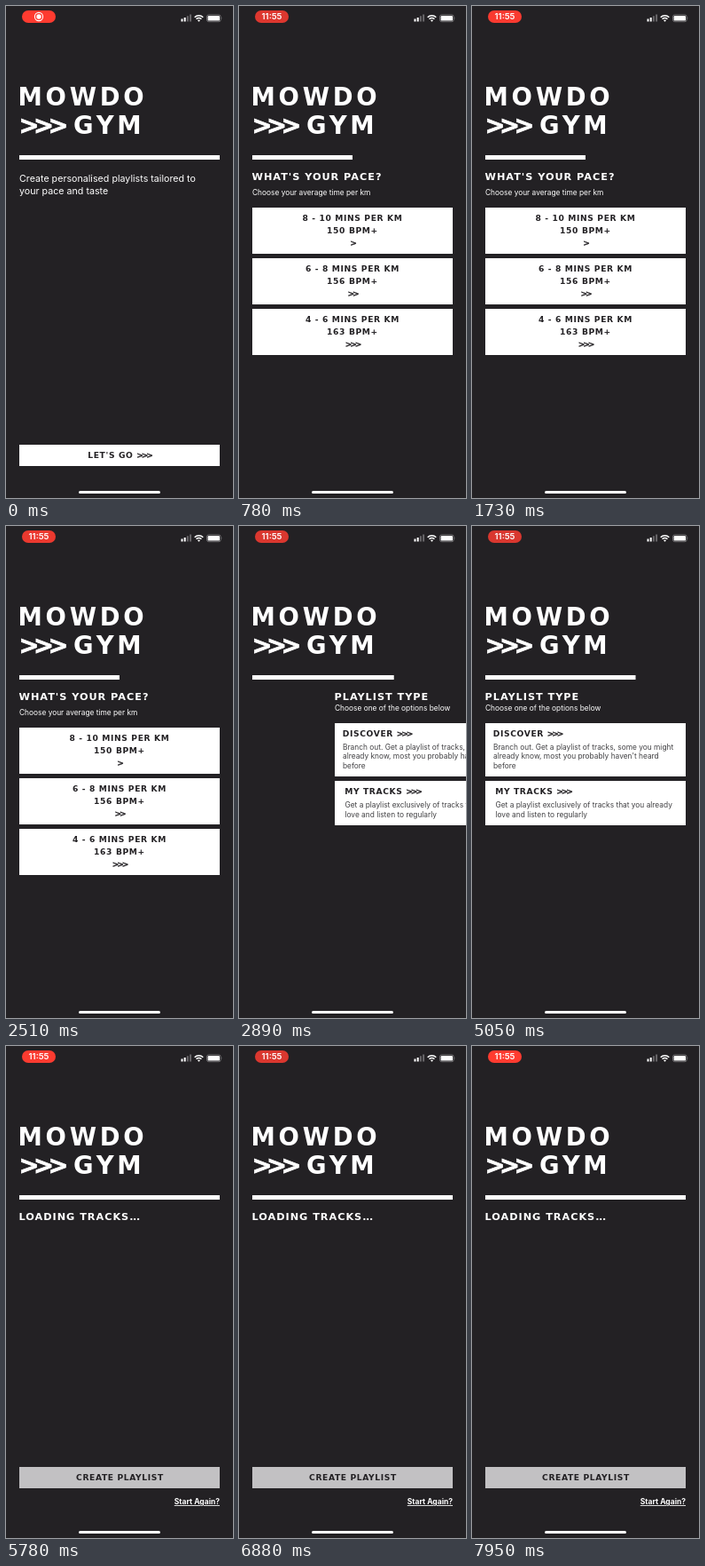
An HTML page that plays this animation: 256 px wide and 554 px high, repeating every 8000 ms.

```html
<!DOCTYPE html>
<html lang="en">
<head>
<meta charset="utf-8">
<title>Running playlists</title>
<style>
  html, body { margin: 0; width: 100%; height: 100%; overflow: hidden; background: #232124; }
  svg { display: block; width: 100%; height: 100%; }
  text { font-family: Inter, Arial, sans-serif; font-size: 8.35px; fill: #fff; white-space: pre; }
  .title, .head, .label { font-family: "DejaVu Sans", Verdana, sans-serif; font-weight: 700; }
  .title { font-size: 27.5px; letter-spacing: 3.7px; }
  .head { font-size: 11.3px; letter-spacing: .95px; }
  .label { font-size: 9.2px; letter-spacing: .6px; }
  .arrows { letter-spacing: -.24em; stroke: currentColor; stroke-width: .025em; }
  .mid { text-anchor: middle; }
  .intro { font-size: 10.7px; }
  .dark { color: #232124; }
  .dark text { fill: #232124; }
  .dark .body { fill: #414043; }
  .dots { letter-spacing: -.04em; }
  .again { font-size: 8.5px; font-weight: 700; text-anchor: end; text-decoration: underline; }
  .clock { font-size: 9.6px; font-weight: 600; }

  .screen, .bar, .icon, .clock { animation: 8s linear infinite; }
  .welcome { animation-name: welcome; }
  .pace { animation-name: pace; }
  .type { animation-name: type; }
  .loading { animation-name: loading; }
  .bar { animation-name: progress; transform-origin: 15px 0; }
  .icon { animation-name: icon; }
  .clock { animation-name: clock; }
  .pill { animation: pulse 1s ease-in-out infinite alternate; }

  @keyframes welcome {
    0%, 3.75% { transform: none; animation-timing-function: ease-in; }
    5.87%, 100% { transform: translateX(-256px); }
  }
  @keyframes pace {
    0%, 5.83% { transform: translateX(256px); animation-timing-function: ease-in-out; }
    9.58%, 31.87% { transform: none; animation-timing-function: ease-in; }
    34%, 100% { transform: translateX(-256px); }
  }
  @keyframes type {
    0%, 33.96% { transform: translateX(256px); animation-timing-function: ease-in-out; }
    37.71%, 65% { transform: none; animation-timing-function: ease-in; }
    67.12%, 100% { transform: translateX(-256px); }
  }
  @keyframes loading {
    0%, 67.08% { transform: translateX(256px); animation-timing-function: ease-in-out; }
    70.83%, 100% { transform: none; }
  }
  @keyframes progress {
    0%, 3.75% { transform: none; animation-timing-function: ease-in-out; }
    9.75%, 31.87% { transform: scaleX(.5); animation-timing-function: ease-in-out; }
    37.87%, 65% { transform: scaleX(.75); animation-timing-function: ease-in-out; }
    71%, 100% { transform: none; }
  }
  @keyframes icon { 0%, 5% { opacity: 1; } 8%, 100% { opacity: 0; } }
  @keyframes clock { 0%, 5% { opacity: 0; } 8%, 100% { opacity: 1; } }
  @keyframes pulse { from { fill: #ff3b30; } to { fill: #d9372f; } }
</style>
</head>
<body>
<svg viewBox="0 0 256 554" fill="#fff" color="#fff">
  <rect width="256" height="554" fill="#232124"/>

  <g class="status">
    <rect class="pill" x="18" y="5" width="38" height="14" rx="7"/>
    <g class="icon">
      <circle cx="37" cy="12" r="4.6" fill="none" stroke="#fff" stroke-width="1.1"/>
      <circle cx="37" cy="12" r="2.7"/>
    </g>
    <text class="clock mid" x="37" y="15.4">11:55</text>
    <path d="M197.5 14.5h2v3h-2zM200.7 13h2v4.5h-2z"/>
    <path d="M203.9 11.3h2v6.2h-2zM207.1 9.5h2v8h-2z" fill="#69676a"/>
    <path d="M212.7 12.7a6.7 6.7 0 0 1 9.6 0M214.6 14.7a4 4 0 0 1 5.8 0" fill="none" stroke="#fff" stroke-width="1.5"/>
    <path d="M217.5 17.8l-1.5-1.6a2.1 2.1 0 0 1 3 0z"/>
    <rect x="226.5" y="9.9" width="15.6" height="7.8" rx="2.2" fill="none" stroke="#858386" stroke-width=".8"/>
    <rect x="227.6" y="11" width="13.4" height="5.6" rx="1.2"/>
    <path d="M242.8 12.6q1.2 1.2 0 2.4z" fill="#858386"/>
  </g>

  <text class="title" x="13.5" y="112">MOWDO</text>
  <text class="title arrows" x="14.5" y="144">&gt;&gt;&gt;</text>
  <text class="title" x="76" y="144">GYM</text>
  <rect class="bar" x="15" y="168" width="226" height="5"/>

  <g class="screen welcome">
    <text class="intro" x="15" y="198">Create personalised playlists tailored to</text>
    <text class="intro" x="15" y="211.5">your pace and taste</text>
    <rect x="15" y="494" width="226" height="24"/>
    <g class="dark"><text class="label mid" x="128" y="508.5">LET'S GO <tspan class="arrows">&gt;&gt;&gt;</tspan></text></g>
  </g>

  <g class="screen pace">
    <text class="head" x="14.5" y="196">WHAT'S YOUR PACE?</text>
    <text x="15" y="213">Choose your average time per km</text>
    <g id="paces" class="dark"></g>
  </g>

  <g class="screen type">
    <text class="head" x="14.5" y="196">PLAYLIST TYPE</text>
    <text x="15" y="208">Choose one of the options below</text>
    <rect x="15" y="222" width="226" height="60"/>
    <rect x="15" y="287" width="226" height="50"/>
    <g class="dark">
      <text class="label" x="23.8" y="236.5">DISCOVER <tspan class="arrows">&gt;&gt;&gt;</tspan></text>
      <text class="body" x="24" y="251.5">Branch out. Get a playlist of tracks, some you might</text>
      <text class="body" x="24" y="262">already know, most you probably haven't heard</text>
      <text class="body" x="24" y="272.5">before</text>
      <text class="label" x="26.2" y="301.5">MY TRACKS <tspan class="arrows">&gt;&gt;&gt;</tspan></text>
      <text class="body" x="26.5" y="317">Get a playlist exclusively of tracks that you already</text>
      <text class="body" x="26.5" y="327.5">love and listen to regularly</text>
    </g>
  </g>

  <g class="screen loading">
    <text class="head" x="14.5" y="196">LOADING TRACKS<tspan class="dots">...</tspan></text>
    <rect x="15" y="474" width="226" height="24" fill="#c2c1c3"/>
    <g class="dark"><text class="label mid" x="128.5" y="488.5">CREATE PLAYLIST</text></g>
    <text class="again" x="241" y="516">Start Again?</text>
  </g>

  <rect x="82" y="546" width="92" height="3" rx="1.5"/>
</svg>
<script>
  const paces = [["8 - 10", 150], ["6 - 8", 156], ["4 - 6", 163]];
  const label = (y, content, extra = "") =>
    `<text class="label mid ${extra}" x="128" y="${y}">${content}</text>`;

  document.getElementById("paces").innerHTML = paces.map(([mins, bpm], i) => {
    const top = 227 + i * 57;
    return `<rect x="15" y="${top}" width="226" height="52"/>`
      + label(top + 14.5, `${mins} MINS PER KM`)
      + label(top + 29, `${bpm} BPM+`)
      + label(top + 42.5, "&gt;".repeat(i + 1), "arrows");
  }).join("");
</script>
</body>
</html>
```
